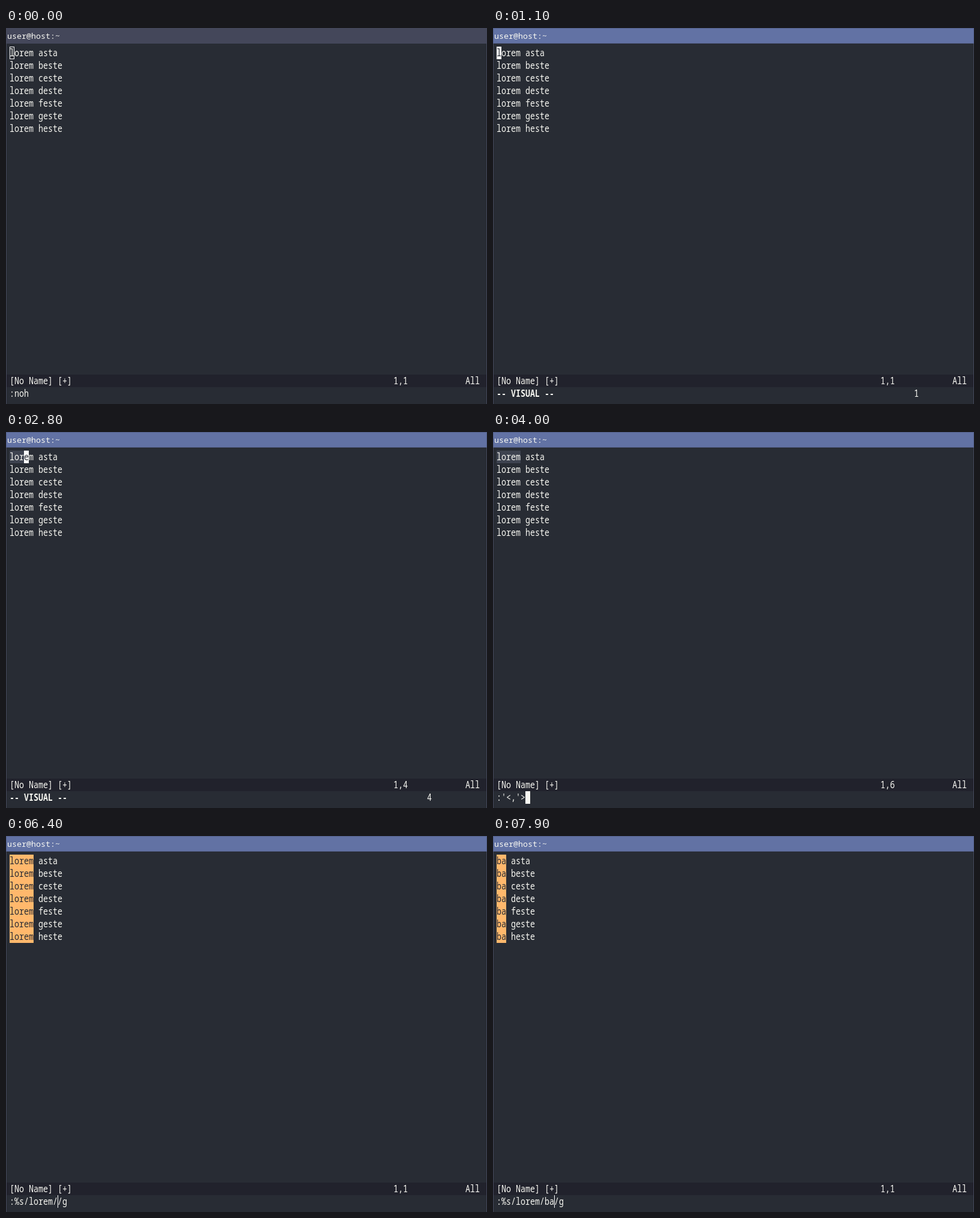
Recreate the animation shown at these times as an HTML page with a canvas. Size 802 by 626 pixels, loop 8 s.

```html
<!DOCTYPE html>
<html lang="en">
<head>
<meta charset="utf-8">
<title>Replace in editor</title>
<style>
html, body { margin: 0; width: 100%; height: 100%; overflow: hidden; background: #282c34; }
canvas { display: block; }
</style>
</head>
<body>
<canvas id="stage" width="802" height="626"></canvas>
<script>
const ctx = document.getElementById('stage').getContext('2d');
const LOOP = 8000, CELL = 8, LINE = 21, LEFT = 6, TOP = 31, STATUS = 26, COMMAND = 27;
const BG = '#282c34', FG = '#f8f8f2', BORDER = '#44475a', FOCUS = '#6272a4', EDGE = '#535f88';
const SELECTED = '#3e4350', MATCH = '#ffb86c', BAR = '#21222c';
const MONO = '"Noto Sans Mono", "DejaVu Sans Mono", monospace';
const TALL = 1.24; // the terminal face is tall and narrow
const WORDS = ['asta', 'beste', 'ceste', 'deste', 'feste', 'geste', 'heste'];

// Choose the font size whose natural advance is one cell.
function cellFont(weight) {
  ctx.font = `${weight} 100px ${MONO}`;
  return `${weight} ${CELL * 100 / ctx.measureText('m').width}px ${MONO}`;
}
const PLAIN = cellFont('normal');
const BOLD = cellFont('bold');

const FOCUS_AT = 100, VISUAL_AT = 1000, PROMPT_AT = 3900, COMPLETE_AT = 5300, REPLACE_AT = 6300;
const MOVES = [1700, 2200, 2600, 3100, 3300];
const KEYS = [4400, 4500, 4700, 4800, 5000, 5100];
const INSERTS = [7500, 7700];
const passed = (times, t) => times.filter(at => at <= t).length;

const cellX = col => LEFT + col * CELL;
const rowY = row => TOP + row * LINE;

function box(color, x, y, w, h) {
  ctx.fillStyle = color;
  ctx.fillRect(x, y, w, h);
}

function cells(color, row, col, count) {
  box(color, cellX(col), rowY(row), count * CELL, LINE);
}

function text(string, row, col, color = FG, font = PLAIN) {
  ctx.save();
  ctx.translate(cellX(col), rowY(row) + 16);
  ctx.scale(1, TALL);
  ctx.font = font;
  ctx.fillStyle = color;
  ctx.fillText(string, 0, 0);
  ctx.restore();
}

function drawWindow(focused) {
  box(BG, 0, 0, 802, 626);
  ctx.strokeStyle = BORDER;
  ctx.lineWidth = 1;
  ctx.strokeRect(0.5, 0.5, 801, 626);
  box(focused ? EDGE : BORDER, 0, 0, 802, 26);
  box(focused ? FOCUS : BORDER, 1, 1, 800, 24);
  ctx.font = PLAIN;
  ctx.fillStyle = FG;
  ctx.fillText('user@host:~', 2, 18);
}

function drawStatus(column) {
  box(BAR, 1, rowY(STATUS), 800, LINE);
  text('[No Name] [+]', STATUS, 0);
  text('1,' + column, STATUS, 80);
  text('All', STATUS, 95);
}

function drawBuffer(head, highlighted) {
  WORDS.forEach((word, row) => {
    if (highlighted) cells(MATCH, row, 0, head.length);
    text(head, row, 0, highlighted ? BG : FG);
    text(word, row, head.length + 1);
  });
}

function drawBlockCursor(col) {
  cells('#fff', 0, col, 1);
  text('lorem '[col], 0, col, BG);
}

function draw(t) {
  const replacing = t >= REPLACE_AT;
  const prompting = t >= PROMPT_AT;
  const visual = t >= VISUAL_AT && !replacing;
  const col = replacing ? 0 : passed(MOVES, t);
  const inserted = 'ba'.slice(0, passed(INSERTS, t));

  drawWindow(t >= FOCUS_AT);
  drawStatus(col + 1);
  if (visual) cells(SELECTED, 0, 0, col);
  drawBuffer(inserted || 'lorem', replacing);

  if (replacing) {
    const before = ':%s/lorem/' + inserted;
    text(before + '/g', COMMAND, 0);
    box('#fff', cellX(before.length), rowY(COMMAND), 1, LINE);
  } else if (prompting) {
    const typed = t >= COMPLETE_AT ? 10 : passed(KEYS, t);
    const command = ":'<,'>" + 'ReplaceAll'.slice(0, typed);
    text(command, COMMAND, 0);
    cells(FG, COMMAND, command.length, 1);
  } else if (visual) {
    text('-- VISUAL --', COMMAND, 0, FG, BOLD);
    text(String(col + 1), COMMAND, 87);
    drawBlockCursor(col);
  } else {
    text(':noh', COMMAND, 0);
    if (t >= FOCUS_AT) {
      drawBlockCursor(0);
    } else {
      ctx.strokeStyle = '#fff';
      ctx.strokeRect(LEFT + 0.5, TOP + 0.5, CELL - 1, LINE - 1);
    }
  }
}

const start = performance.now();
function frame() {
  draw((performance.now() - start) % LOOP);
  requestAnimationFrame(frame);
}
frame();
</script>
</body>
</html>
```
